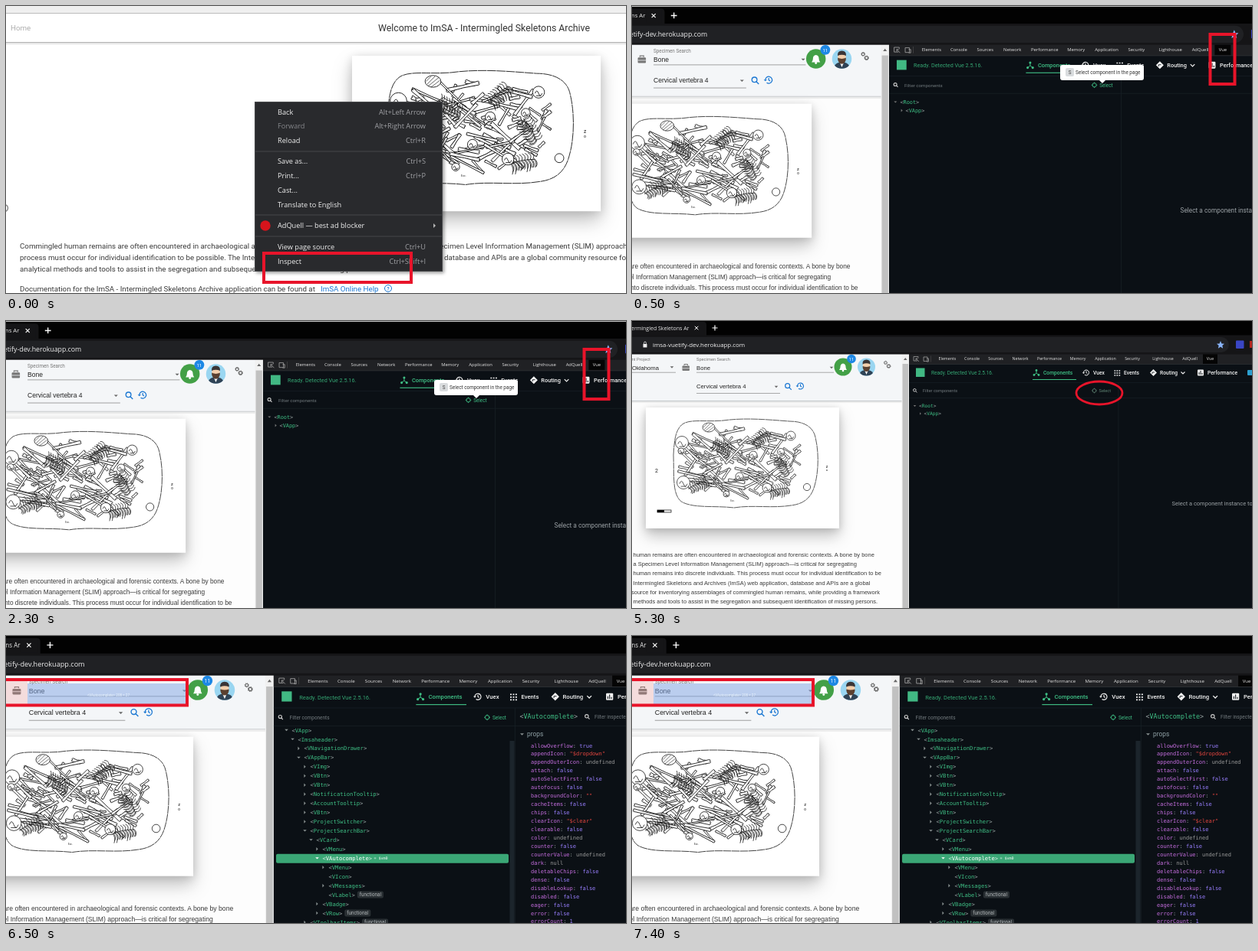
Recreate the animation shown at these times as an HTML page. Size 808 px wide and 375 px high, loop 8000 ms.

```html
<!DOCTYPE html>
<html lang="en">
<head>
<meta charset="utf-8">
<title>Inspecting a component</title>
<style>
html, body { margin: 0; width: 100%; height: 100%; overflow: hidden; background: #fff; }
svg { display: block; width: 100vw; height: 100vh; }
text { font-family: Roboto, sans-serif; white-space: pre; }
.ui { font-family: "Open Sans", sans-serif; }
.body { font-family: "Liberation Sans", sans-serif; }
.mono { font-family: "DejaVu Sans Mono", monospace; }
.mid { text-anchor: middle; }
.end { text-anchor: end; }
.med { font-weight: 500; }
.card { fill: #fff; filter: drop-shadow(0 10px 10px rgba(0,0,0,.2)) drop-shadow(0 2px 5px rgba(0,0,0,.16)); }
.scene { visibility: hidden; animation: 8s step-end infinite; }
#menu { animation-name: menu; }
#tab { animation-name: tab; }
#pick { animation-name: pick; }
#tree { animation-name: tree; }
@keyframes menu { 0% { visibility: visible } 6.25%, 100% { visibility: hidden } }
@keyframes tab { 0% { visibility: hidden } 6.25% { visibility: visible } 43.75%, 100% { visibility: hidden } }
@keyframes pick { 0% { visibility: hidden } 43.75% { visibility: visible } 81.25%, 100% { visibility: hidden } }
@keyframes tree { 0% { visibility: hidden } 81.25%, 100% { visibility: visible } }
</style>
</head>
<body>
<svg id="stage" viewBox="0 0 808 375" preserveAspectRatio="none"></svg>
<script>
const GREEN = '#3fbf85', RED = '#e8142a', BLUE = '#1976d2', INK = '#3a3a3a';

const esc = s => s.replace(/&/g, '&amp;').replace(/</g, '&lt;');
// Text is placed by its left edge (or anchor) and its vertical middle.
const text = (x, y, s, size, fill, cls = '') =>
  `<text x="${x}" y="${(y + size * .36).toFixed(2)}" font-size="${size}" fill="${fill}" class="${cls}">${esc(s)}</text>`;
const rect = (x, y, w, h, fill, more = '') =>
  `<rect x="${x}" y="${y}" width="${w}" height="${h}" fill="${fill}" ${more}/>`;
const circle = (x, y, r, fill, more = '') => `<circle cx="${x}" cy="${y}" r="${r}" fill="${fill}" ${more}/>`;
const line = (d, stroke, w = 1, more = '') => `<path d="${d}" fill="none" stroke="${stroke}" stroke-width="${w}" ${more}/>`;
const shape = (d, fill) => `<path d="${d}" fill="${fill}"/>`;
const frame = (x, y, w, h) => rect(x, y, w, h, 'none', `stroke="${RED}" stroke-width="4"`);
const down = (x, y, r, fill) => shape(`M${x - r} ${y - r / 2}h${2 * r}l${-r} ${r}z`, fill);
const right = (x, y, r, fill) => shape(`M${x - r / 2} ${y - r}v${2 * r}l${r} ${-r}z`, fill);
const lens = (x, y, r, c, w) => line(`M${x + r * .6} ${y + r * .6}l${r} ${r}`, c, w) +
  circle(x - r * .1, y - r * .1, r, 'none', `stroke="${c}" stroke-width="${w}"`);
const clock = (x, y, r, c, w) => line(`M${x - r} ${y}a${r} ${r} 0 1 1 ${r * .4} ${r * .8}M${x} ${y - r * .6}v${r * .6}l${r * .4} ${r * .3}`, c, w) +
  down(x - r, y + .5, r * .5, c);
const gear = (x, y, r, c) => circle(x, y, r, 'none', `stroke="${c}" stroke-width="${r * .6}"`) +
  circle(x, y, r * 1.4, 'none', `stroke="${c}" stroke-width="${r * .5}" stroke-dasharray="${r * .6} ${r * .5}"`);
const target = (x, y, c) => circle(x, y, 2.4, 'none', `stroke="${c}" stroke-width=".8"`) +
  line(`M${x - 3.4} ${y}h1.6m3.6 0h1.6M${x} ${y - 3.4}v1.6m0 3.6v1.6`, c, .7);

// Excavation drawing in a 252 x 158 card.
function drawing() {
  let seed = 11;
  const rnd = (a = 0, b = 1) => a + (b - a) * ((seed = seed * 16807 % 2147483647) / 2147483647);
  const bone = (x, y, len, turn, w) => {
    const r = w / 2, cap = s => `a${r} ${r} 0 0 1 0 ${s}`.repeat(2);
    return `<path transform="translate(${x.toFixed(1)} ${y.toFixed(1)}) rotate(${turn.toFixed(0)})" d="M${-len / 2} ${-w}Q0 ${-w * .3} ${len / 2} ${-w}${cap(w)}Q0 ${w * .3} ${-len / 2} ${w}${cap(-w)}z"/>`;
  };
  const ribs = (x, y, turn) => {
    let d = 'M-13 0Q0 -3 13 0';
    for (let i = -12; i <= 12; i += 3) d += `M${i} -1q4 5 0 ${rnd(7, 13).toFixed(1)}M${i + 1} -1q4 5 0 9M${i} -1q3 -4 -1 -7`;
    return `<path fill="none" stroke-width=".6" transform="translate(${x} ${y}) rotate(${turn})" d="${d}"/>`;
  };
  const skull = (x, y, r) => `<circle cx="${x}" cy="${y}" r="${r}"/><path fill="none" d="M${x - r * .6} ${y + r * .2}q${r * .3} ${-r * .8} ${r * .6} 0t${r * .6} 0M${x - r * .4} ${y + r * .6}h${r * .8}"/>`;
  let out = `<path stroke-dasharray="9 .5" d="M36 62C37 45 38 28 49 21C60 15 80 19 101 17C130 13 160 16 187 18C204 18 218 24 221 39C226 60 225 85 220 102C216 117 207 126 189 128C164 132 139 127 115 131C90 128 65 132 48 124C34 116 37 90 36 62z"/>`;
  for (let i = 0; i < 125; i++) {
    const a = rnd(0, 6.283), k = Math.sqrt(rnd());
    out += bone(127 + 78 * k * Math.cos(a), 72 + 45 * k * Math.sin(a), i < 70 ? rnd(6, 16) : rnd(14, 38), rnd() < .65 ? rnd(5, 50) : rnd(-65, -10), rnd(1, 2.1));
  }
  out += ribs(67, 101, -25) + ribs(172, 108, -12) + ribs(98, 52, 30) + ribs(180, 75, 60) + ribs(148, 40, -40);
  for (const [x, y, r] of [[47, 46, 8.5], [46, 57, 4], [49, 98, 8.5], [189, 37, 6], [158, 105, 6], [122, 90, 5], [140, 62, 5], [176, 58, 4.5], [105, 113, 4]])
    out += skull(x, y, r);
  out += `<ellipse cx="82" cy="26" rx="8" ry="6"/><path fill="none" stroke-width=".5" d="M76 29l8-8M77 31l11-9M80 32l9-7M75 26l5-5"/><circle cx="210" cy="104" r="4.6"/>`;
  return `<g id="art"><g fill="#fff" stroke="#161616" stroke-width=".7">${out}</g>` +
    text(236, 77, 'z', 5, '#111', 'mid') + text(236, 82, 'o', 4, '#111', 'mid') + text(14, 82, '2', 7, '#222', 'mid') +
    text(113, 122, 'Exc.', 3, '#333', 'mid') +
    rect(15, 134, 18, 3, '#fff', 'stroke="#000" stroke-width=".7"') + rect(15, 134, 9, 3, '#000') + '</g>';
}

function menuScene() {
  const items = [['Back', 139, 'Alt+Left Arrow'], ['Forward', 157, 'Alt+Right Arrow'], ['Reload', 176, 'Ctrl+R'],
    ['Save as...', 203, 'Ctrl+S'], ['Print...', 222, 'Ctrl+P'], ['Cast...', 241, ''], ['Translate to English', 260, ''],
    ['AdQuell — best ad blocker', 287, ''], ['View page source', 315, 'Ctrl+U'], ['Inspect', 334, 'Ctrl+Shift+I']];
  const body = (x, y, s) => text(x, y, s, 9.75, INK);
  return rect(0, 0, 808, 375, '#fff') + rect(0, 0, 808, 9, '#efefef') + rect(0, 9, 808, 1, '#bdbdbd') +
    rect(0, 47, 808, 1.5, '#b5b5b5') + rect(0, 48.5, 808, 2, '#ececec') +
    text(6, 28.5, 'Home', 9.75, '#adadad') +
    text(485, 28.5, 'Welcome to ImSA - Intermingled Skeletons Archive', 12.3, '#333') +
    circle(-2, 264, 4.5, 'none', 'stroke="#888" stroke-width="1.5"') +
    `<g transform="translate(451 65) scale(1.286)">${rect(0, 0, 252, 158, '#fff', 'class="card"')}<use href="#art"/></g>` +
    body(18, 313, 'Commingled human remains are often encountered in archaeological and forensic') +
    body(554, 313, 'Specimen Level Information Management (SLIM) approach—is') +
    body(18, 328, 'process must occur for individual identification to be possible. The Intermingled') +
    body(571, 328, 'database and APIs are a global community resource for') +
    body(18, 343, 'analytical methods and tools to assist in the segregation and subsequent identification of missing persons.') +
    body(18, 369, 'Documentation for the ImSA - Intermingled Skeletons Archive application can be found at') +
    text(410, 369, 'ImSA Online Help', 9.75, BLUE) +
    circle(498, 369, 4.5, 'none', `stroke="${BLUE}"`) + text(498, 369, '?', 7, BLUE, 'mid med') +
    rect(324.5, 125.5, 244, 221, '#292a2d', 'stroke="#47484b" style="filter:drop-shadow(2px 2px 2px rgba(0,0,0,.4))"') +
    [190, 273, 301].map(y => rect(325, y - .5, 243, 1, '#46474a')).join('') +
    items.map(([s, y, key]) => text(354, y, s, 9.2, s === 'Forward' ? '#85868a' : '#f1f1f1', 'ui') +
      text(547, y, key, 9.2, '#a0a1a5', 'ui end')).join('') +
    circle(338, 287, 6.7, '#d8141c') + right(558.5, 287, 3, '#b5b5b5') + frame(336, 323, 192, 38);
}

function chrome() {
  return rect(-10, -5, 900, 24, '#020202') + shape('M-10 19V3Q-10 1 -8 1H93Q97 1 97 5V19z', '#151517') +
    rect(-10, 18.5, 900, 25, '#151517') + rect(-20, 21, 798, 20, '#202124', 'rx="10"') +
    text(-1, 9, 'ermingled Skeletons Ar', 7, '#e8e8e8', 'ui') + rect(75, 2, 18, 15, '#151517') +
    line('M81.8 6.8l4.6 4.6m0 -4.6l-4.6 4.6', '#fff', 1) + line('M108 5.5v7m-3.5 -3.5h7', '#fff', 1.2) +
    rect(14.5, 30, 5, 4.5, '#eee') + line('M15.6 30v-1.5a1.4 1.4 0 0 1 2.8 0v1.5', '#eee', .8) +
    text(27, 31, 'imsa-vuetify-dev.herokuapp.com', 7.9, '#f0f0f0', 'ui') +
    shape('M767 26l1.4 3.4 3.6 .3-2.7 2.4 .8 3.6-3.1-1.9-3.1 1.9 .8-3.6-2.7-2.4 3.6-.3z', '#8ab4f8') +
    rect(787, 25.5, 10.5, 10.5, '#3a46c4', 'rx="1"') + rect(805, 26, 8, 9, '#b3261e');
}

function page(shift) {
  const lines = ['human remains are often encountered in archaeological and forensic contexts. A bone by bone',
    'a Specimen Level Information Management (SLIM) approach—is critical for segregating',
    'human remains into discrete individuals. This process must occur for individual identification to be',
    'Intermingled Skeletons and Archives (ImSA) web application, database and APIs are a global',
    'source for inventorying assemblages of commingled human remains, while providing a framework',
    'methods and tools to assist in the segregation and subsequent identification of missing persons.'];
  const label = (x, y, s, cls) => text(x, y, s, 5.7, '#777', cls);
  const value = (x, y, s, cls = '') => text(x, y, s, 7.7, '#222', 'body ' + cls);
  const avatar = circle(305.5, 60, 11.5, '#9ad6f1') + shape('M297 68q2-4 8.5-4t8.5 4q-3 3.5-8.5 3.5t-8.5-3.5z', '#2f4356') +
    shape('M303 64h5l-2.5 6z', '#fff') + circle(305.5, 58, 4.8, '#f3cfac') +
    shape('M300.7 59q4.8 2 9.6 0v2q-1 5-4.8 5t-4.8-5z', '#5a4030') +
    shape('M300.5 56.500q-.5-6 5-6t5 6q-5-2.5-10 0z', '#3a3536');
  return rect(-10, 43, 371, 340, '#fdfdfd') + rect(-10, 43, 362, 61, '#f4f6f8') + rect(-10, 104, 362, 1, '#c4c8cb') + rect(-10, 105, 362, 2, '#ececec') +
    label(24, 50, 'Current Project', 'end') + value(35, 61, 'USS - Oklahoma', 'end') + down(52, 60.5, 2.3, '#666') + rect(-10, 66.8, 67, .7, '#888') +
    rect(65.5, 58.5, 9.5, 6.5, '#777', 'rx="1"') + line('M68 58v-1.5h4.5v1.5', '#777', 1) + line('M65.5 61.8h9.5', '#f4f6f8', .7) +
    label(84, 50.3, 'Specimen Search') + value(84, 61, 'Bone') + down(260, 61, 2.3, '#666') + rect(84, 66.8, 179, .7, '#888') +
    value(84, 85.6, 'Cervical vertebra 4') + down(188, 86, 2.3, '#666') + rect(84, 94, 109, .7, '#888') +
    lens(203, 85, 3, BLUE, 1.2) + clock(219.5, 85, 4, BLUE, 1.1) +
    circle(275, 60, 11.5, '#43a047') + shape('M270 64q1.5-1.5 1.5-4 0-4 3.5-4.5 3.5 .5 3.5 4.5 0 2.5 1.5 4z', '#fff') + circle(275, 65, 1.3, '#fff') +
    avatar + circle(286, 49.5, 5.8, '#1e88e5') + text(286, 49.5, '11', 5.6, '#fff', 'mid') +
    gear(330.5, 54.5, 1.6, '#666') + gear(334.5, 59, 1.8, '#666') +
    `<g transform="translate(18 113)">${rect(0, 0, 252, 158, '#fff', 'class="card"')}<use href="#art"/></g>` +
    lines.map((s, i) => text(i === 4 ? -1 : 1.5, 305 + shift + i * 12.35, s, 7.5, INK, 'body')).join('') +
    rect(351.5, 43, 9.5, 340, '#f1f1f1') + rect(352.5, 56, 7.5, 330, '#c1c1c1') + shape('M354 51h4.5l-2.25-3z', '#666');
}

function tag(x, y, name, size, fill = GREEN, bracket = '#9aa5a5') {
  return `<text x="${x}" y="${y + size * .36}" font-size="${size}" fill="${bracket}" class="mono">&lt;<tspan fill="${fill}">${name}</tspan>&gt;</text>`;
}

function devtools(selectColor, root) {
  const tabs = [['Elements', 411], ['Console', 443], ['Sources', 474], ['Network', 506], ['Performance', 544], ['Memory', 581],
    ['Application', 617], ['Security', 652], ['Lighthouse', 692], ['AdQuell', 727], ['Vue', 753.5]];
  const views = [['Components', 536], ['Vuex', 601], ['Events', 641], ['Routing', 688], ['Performance', 750]];
  const w = '#f2f2f2';
  return rect(361, 43, 500, 340, '#0b1015') + rect(361, 43, 500, 13, '#202124') + rect(744, 43, 19, 13, '#050505') + rect(361, 56, 500, .6, '#3a3c40') +
    line('M372 52h-5v-5.5h6v2M370 49l4 4m-4-4v2.5m0-2.5h2.5', '#aaa', .7) + line('M380 47h5v5.5h-5zM384 49h2.5v4h-2.5', '#aaa', .7) + rect(389, 45.5, .5, 8, '#555') +
    tabs.map(([s, x]) => text(x, 49.5, s, 5.3, '#e4e4e4', 'ui mid')).join('') +
    rect(370, 61.5, 11.5, 11.5, '#41b883') + text(390, 68, 'Ready. Detected Vue 2.5.16.', 6.5, '#35a673') +
    views.map(([s, x], i) => text(x, 67.8, s, 6.7, i ? w : GREEN, 'med')).join('') + rect(522, 76, 57, 1, GREEN) +
    line('M527 64v4l-3 2.5M527 68l3 2.5', GREEN, .9) + circle(527, 64.5, 1.4, GREEN) + circle(524, 70.5, 1.4, GREEN) + circle(530, 70.5, 1.4, GREEN) +
    clock(592, 67.5, 3.5, w, 1) + line('M628.5 65h8m-8 3h8m-8 3h8', w, 1.5, 'stroke-dasharray="1.7 1.3"') +
    shape('M679.5 63l4.5 4.5-4.5 4.5-4.5-4.5z', w) + line('M678 69v-2h3', '#0b1015', .8) + line('M715.5 66.5l2.5 2.5 2.5-2.5', w, 1.1) +
    rect(737, 63.5, 8, 8, w, 'rx="1"') + line('M739 70v-3m2 3v-5m2 5v-2', '#0b1015', .9) + rect(802, 64, 7, 7, '#2b9fd0', 'rx="1"') +
    rect(361, 80, 500, .6, '#182028') + rect(361, 100.5, 500, .6, '#1a2228') + rect(633.5, 80, .8, 300, '#171f25') +
    lens(368.5, 90.5, 1.8, '#ccc', 1) + text(379, 91, 'Filter components', 5.6, '#727a7e') +
    target(602.5, 91, selectColor) + text(608.5, 91, 'Select', 5.7, selectColor) +
    (root ? down(368.5, 111, 1.8, '#777') + tag(374, 111, 'Root', 6.2) + right(376, 121, 1.8, '#777') + tag(380.5, 121, 'VApp', 6.2) +
      text(703.5, 238.5, 'Select a component instance to inspect.', 7.5, '#9ba1a5') : '');
}

const browser = (x, y, k, select, root, shift = 0) =>
  `<g transform="translate(${x} ${y}) scale(${k})">${page(shift)}${devtools(select, root)}${chrome()}</g>`;

const tabScene = () => browser(-65, 2.5, 1.108, GREEN, true) + rect(0, 0, 808, 1, '#c4c4c4') +
  shape('M608 96h10l-5 5z', '#fff') + rect(558, 77, 109, 20, '#fff', 'rx="3"') + rect(565, 81, 11, 11, '#d9dcde', 'rx="2"') +
  text(570.5, 86.7, 'S', 6.3, '#444', 'mid') + text(578, 86.7, 'Select component in the page', 6.4, '#333') +
  frame(753.5, 37, 32, 65);

const pickScene = () => browser(0, 0, 1, '#5e8272', true) +
  `<ellipse cx="609" cy="94" rx="30" ry="15" fill="none" stroke="${RED}" stroke-width="2.8"/>`;

function treeScene() {
  // depth, state of the arrow, name
  const nodes = `0vVApp 1vImsaheader 2>VNavigationDrawer 2vVAppBar 3>VImg 3>VBtn 3>VBtn 3>NotificationTooltip 3>AccountTooltip 3>VBtn
    3>ProjectSwitcher 3vProjectSearchBar 4vVCard 5>VMenu 5vVAutocomplete 6>VMenu 6.VIcon 6>VMessages 6.VLabel 5>VBadge 5>VRow 3>VToolbarItems`.split(/\s+/);
  const props = `allowOverflow:true appendIcon:"$dropdown" appendOuterIcon:undefined attach:false autoSelectFirst:false autofocus:false
    backgroundColor:"" cacheItems:false chips:false clearIcon:"$clear" clearable:false color:undefined counter:false counterValue:undefined
    dark:null deletableChips:false dense:false disableLookup:false disabled:false eager:false error:false errorCount:1`.split(/\s+/);
  const tone = v => v[0] === '"' ? '#e3453f' : /^(u|null)/.test(v) ? '#999' : '#997fff';
  const row = (s, i) => {
    const x = 372.5 + 8 * s[0], y = 123 + i * 11.95, name = s.slice(2), on = name === 'VAutocomplete', c = on ? '#fff' : '#8a9292';
    const badge = x + 4.3 * (name.length + 2) + 3;
    return (on ? rect(352, y - 5.5, 303, 12, '#3ba776', 'rx="2"') : '') +
      (s[1] === 'v' ? down(x - 7, y, 2.3, c) : s[1] === '>' ? right(x - 7, y, 2.3, c) : '') +
      tag(x, y, name, 7.15, on ? '#fff' : GREEN, on ? '#d5eee2' : undefined) +
      (on ? text(x + 67, y, '= $vm0', 5, '#fff', 'mono') : '') +
      (/^V(Label|Row|ToolbarItems)$/.test(name) ? rect(badge, y - 4.5, 34, 9, '#2a3034', 'rx="2"') +
        text(badge + 17, y, 'functional', 6.3, '#b0b5b7', 'mid') : '');
  };
  return browser(-67, 1.5, 1.152, GREEN, false, 2.5) + rect(656.5, 137, 6, 240, '#1c252c') + nodes.map(row).join('') +
    tag(669.5, 105, 'VAutocomplete', 8.4) + lens(757, 105, 2.2, '#ccc', 1.1) + text(767, 105.5, 'Filter inspected data', 6.5, '#727a7e') +
    down(672.5, 128.5, 2.5, '#8a9292') + text(679, 128, 'props', 8.4, '#8fa0a5') +
    props.map((s, i) => {
      const [key, val] = s.split(':'), y = 143 + i * 10.95;
      return `<text x="684" y="${y + 2.5}" font-size="7" class="mono" fill="#9aa5a5"><tspan fill="#c66ee0">${key}</tspan>: <tspan fill="${tone(val)}">${val}</tspan></text>`;
    }).join('') +
    rect(0, 58, 28, 31, 'rgba(240,130,120,.22)') +
    rect(28, 62, 208, 27, 'rgba(130,165,230,.5)') + text(106, 77, '<VAutocomplete> 208 × 27', 4.6, '#e8f2fb') +
    frame(-8, 57, 244, 33.5);
}

const scene = (id, inner) => `<g id="${id}" class="scene">${inner}</g>`;
document.getElementById('stage').innerHTML = `<defs>${drawing()}</defs>` +
  scene('menu', menuScene()) + scene('tab', tabScene()) + scene('pick', pickScene()) + scene('tree', treeScene());
</script>
</body>
</html>
```
